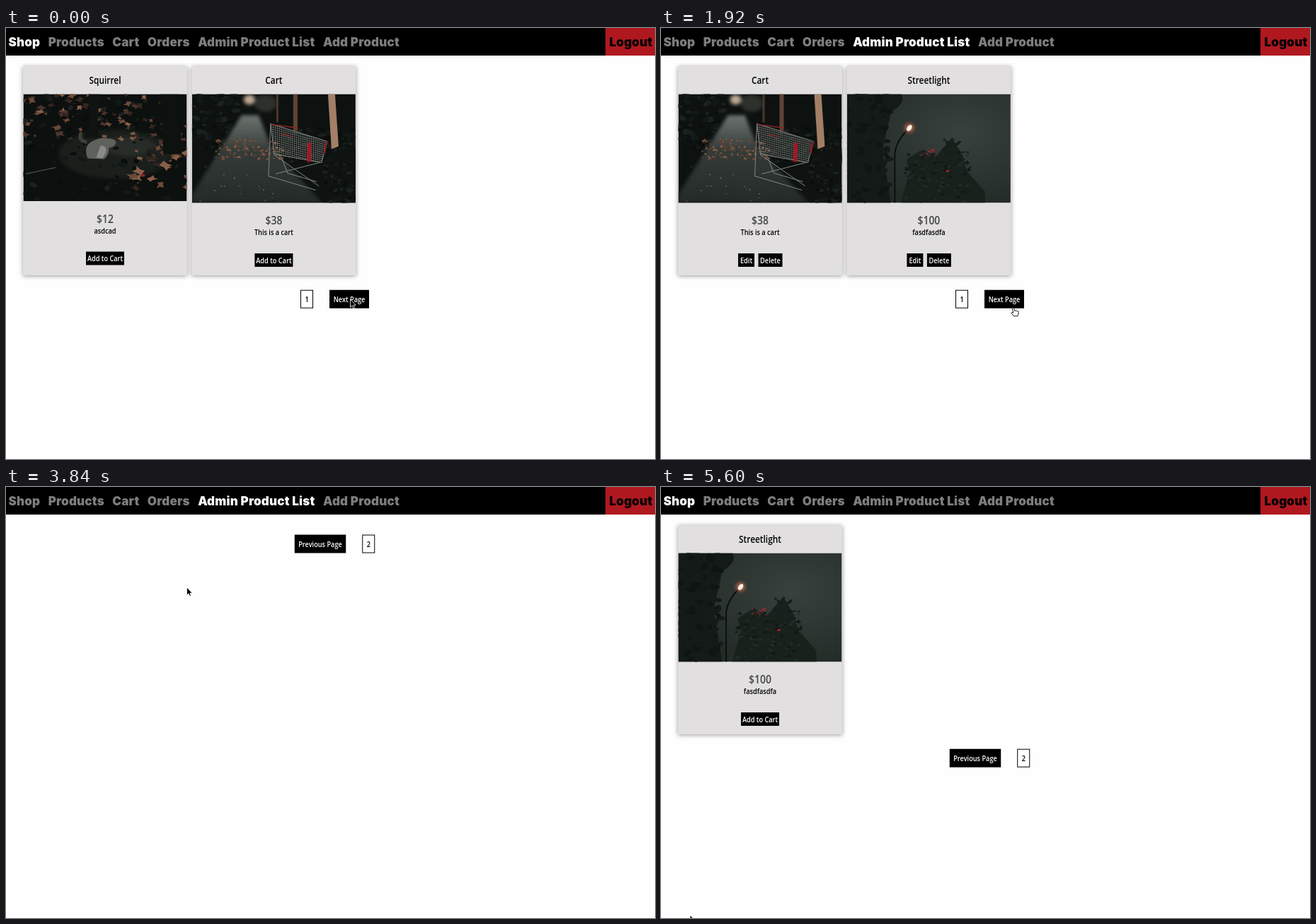
These frames come from a looping animation (917x610 px, 5760 ms). An HTML page:

```html
<!DOCTYPE html>
<html lang="en">
<head>
<meta charset="utf-8">
<title>Shop</title>
<style>
  html, body { margin: 0; width: 100%; height: 100%; overflow: hidden; background: #fefefe; }
  #stage { display: block; width: 917px; height: 610px; }
  .nav { font: 900 17px Inter, sans-serif; letter-spacing: .2px; }
  .label { font-family: "Open Sans", "Noto Sans", sans-serif; font-weight: 600; text-anchor: middle; }
  .card { filter: drop-shadow(0 1.5px 3px #0006); }
  .soft { filter: blur(2.5px); }
</style>
</head>
<body>
<svg id="stage" viewBox="0 0 917 610">
  <defs>
    <radialGradient id="glow">
      <stop stop-color="#ff9a6a"/>
      <stop offset="1" stop-color="#703828" stop-opacity="0"/>
    </radialGradient>
    <radialGradient id="dusk" cx=".7" cy=".35" r=".75">
      <stop stop-color="#39413e"/>
      <stop offset="1" stop-color="#222a26"/>
    </radialGradient>
    <linearGradient id="path" x2="0" y2="1">
      <stop stop-color="#6d7470"/>
      <stop offset=".4" stop-color="#343b38"/>
      <stop offset="1" stop-color="#232a28"/>
    </linearGradient>
    <pattern id="mesh" width="3" height="3" patternUnits="userSpaceOnUse" patternTransform="skewY(14)">
      <path d="M0 .5H3M.5 0V3" stroke="#8e918d" stroke-width=".5"/>
    </pattern>
    <path id="leaf" d="M-6 0L-2-2 1-5 2-1 6 1 1 2-2 5Z"/>
    <ellipse id="blob" rx="5" ry="3.2"/>
    <path id="arrow" d="M0 0V11.2L2.6 8.8 4.2 12.6 6 11.8 4.5 8.2H7.8Z" stroke="#fff" stroke-width=".8"/>
    <path id="hand" d="M-1 1Q0-.9 1.2.8L2.2 4.4Q3.4 3.3 4.2 4.5 5.4 3.6 6.1 4.9 7.6 4.3 7.7 6.2L7.4 9.2 6.4 11.8H1.2L-2.5 7.6Q-2.6 6 -.8 6.6L.2 7.2Z" fill="#fff" stroke="#000" stroke-width=".9"/>
    <g id="photos"></g>
  </defs>
  <g id="page"></g>
  <use id="cursor"/>
</svg>
<script>
const STEP = 160, LOOP = 5760, PAGE_SIZE = 2;
const $ = id => document.getElementById(id);

let seed = 48271;
const random = () => (seed = seed * 16807 % 2147483647) / 2147483647;
const spread = (middle, reach) => middle + (random() * 2 - 1) * reach;

// Strews a small shape around (x, y), lying flat and turned at random.
function scatter(id, count, x, y, reachX, reachY, size, colors) {
  return Array.from({ length: count }, () => {
    const place = `translate(${spread(x, reachX)} ${spread(y, reachY)}) scale(1 .7)`;
    const turn = `rotate(${random() * 360}) scale(${size * (.4 + random())})`;
    return `<use href="#${id}" transform="${place} ${turn}" fill="${colors[Math.floor(random() * colors.length)]}"/>`;
  }).join('');
}

const rect = (x, y, w, h, fill, extra = '') =>
  `<rect x="${x}" y="${y}" width="${w}" height="${h}" fill="${fill}" ${extra}/>`;
const oval = (x, y, rx, ry, fill) => `<ellipse cx="${x}" cy="${y}" rx="${rx}" ry="${ry}" fill="${fill}"/>`;
const shape = (d, fill) => `<path d="${d}" fill="${fill}"/>`;
const line = (d, color, width) => `<path d="${d}" fill="none" stroke="${color}" stroke-width="${width}"/>`;
const soft = content => `<g class="soft">${content}</g>`;
const backdrop = fill => rect(0, 0, 231, 154, fill);

const rust = ['#4b352b', '#6d4938', '#8a5f49', '#33261f'];
const night = ['#090d0c', '#121815', '#1b211d'];
const green = ['#2b4732', '#3b5c42', '#1c3023', '#0f1812'];

const squirrel = () =>
  backdrop('#0c100f') +
  soft(oval(130, 85, 80, 35, '#1a1f1b') + oval(150, 74, 36, 14, '#282c28')) +
  scatter('blob', 90, 115, 75, 115, 75, 1, night) +
  scatter('leaf', 70, 115, 32, 115, 32, 1, rust) +
  scatter('leaf', 40, 190, 100, 45, 45, 1.3, rust) +
  shape('M92 0H108L104 50 110 62H86L95 45Z', '#0f1311') +
  shape('M193 0H220L224 85H198Z', '#0d1110') +
  line('M3 113L46 104', '#5a5d58', 1) +
  line('M90 68Q76 66 82 54', '#3d3e3a', 5) +
  shape('M91 91Q83 72 101 65Q112 60 120 63Q130 62 131 69Q129 75 121 76Q121 87 114 92Z', '#5f615d') +
  shape('M109 73Q118 72 117 82L112 91 103 90Z', '#8b8a84') +
  oval(169, 115, 3, 2, '#8d2422');

const cart = () =>
  backdrop('#0d1210') +
  scatter('blob', 80, 32, 40, 32, 40, 1, night) +
  soft(oval(81, 8, 8, 7, '#bda992') + oval(104, 13, 16, 12, '#2e302b') +
    shape('M70 30H94L112 75 184 154H0V142Z', 'url(#path)')) +
  scatter('leaf', 140, 82, 78, 48, 14, .4, ['#795039', '#8f6044', '#5c4233']) +
  scatter('leaf', 60, 90, 120, 80, 34, .25, rust) +
  scatter('blob', 130, 185, 72, 52, 24, .8, night) +
  shape('M155 91L231 75V154H185Z', '#0e1311') +
  scatter('blob', 60, 210, 122, 24, 32, .8, night) +
  rect(143, 0, 6, 52, '#5f4335') + rect(119, 0, 3, 40, '#4a372c') +
  shape('M192 0H202L207 74 197 78Z', '#a27f66') +
  shape('M111 42L191 67 183 97 116 85Z', 'url(#mesh)') +
  line('M111 42L191 67 183 97 116 85ZL108 116 175 136M116 86L179 130M126 89L135 112 176 124M180 97L118 113', '#858884', 1) +
  line('M111 43L150 48M126 57L141 60', '#842626', 1.5) +
  line('M166 69L165 96', '#a51722', 5.5) + line('M190 67L187 84', '#8d1d24', 2.5);

const streetlight = () =>
  backdrop('url(#dusk)') +
  shape('M0 0H77Q83 14 62 25L50 80 62 154H0Z', '#131a17') +
  scatter('blob', 110, 30, 77, 30, 77, 1.2, ['#0f1512', '#141b18']) +
  shape('M76 154L88 112 84 92 107 78 125 89 148 62 162 84 170 110 195 138V154Z', '#19211d') +
  scatter('leaf', 150, 128, 118, 46, 36, .6, ['#171f1b', '#111814', '#222b26']) +
  scatter('leaf', 30, 150, 82, 14, 18, .6, ['#161e1a']) +
  scatter('leaf', 18, 114, 84, 10, 6, .3, ['#a92b2b', '#7e2424']) +
  oval(142, 109, 2.5, 1.5, '#a52424') +
  line('M67.5 154V84Q69 67 85 51', '#080c0a', 1.8) +
  oval(88, 48, 11, 11, 'url(#glow)') +
  `<g transform="rotate(35 88 48)">${oval(88, 48, 3, 5, '#fff0e5')}</g>`;

const rose = () =>
  backdrop('#18211b') +
  soft(oval(120, 25, 38, 22, '#4c564f') + oval(150, 38, 28, 18, '#414c44') +
    scatter('blob', 110, 150, 80, 95, 38, 2.2, green) +
    scatter('blob', 40, 25, 55, 45, 50, 2, ['#141c17', '#1f2b23']) +
    scatter('blob', 50, 150, 135, 80, 22, 2.2, ['#0d1510', '#18271d']) +
    oval(21, 36, 8, 8, '#633a2c') + oval(17, 8, 5, 8, '#4a3228') + oval(87, 75, 5, 5, '#8a4b38') +
    oval(218, 105, 5, 4, '#8a2329')) +
  line('M112 78Q106 108 82 154M25 154L42 120', '#22382a', 1.2) +
  scatter('blob', 14, 55, 140, 40, 16, 1.8, ['#34583d', '#456d4e']) +
  scatter('blob', 7, 108, 72, 14, 12, 1.4, ['#2f5038']) +
  shape('M102 50Q108 42 119 44Q131 42 136 54Q142 61 135 70Q125 82 112 78Q99 73 102 62Z', '#650f17') +
  shape('M103 55Q115 61 116 77Q104 77 102 65ZM120 46Q133 46 133 57L121 64 112 54Z', '#861922') +
  line('M109 52Q119 46 128 54Q127 66 116 62Q115 53 123 55M137 60Q130 72 117 74', '#35090e', 1.5) +
  line('M131 60Q137 61 136 67', '#b14347', 1);

const products = {
  Squirrel: { photo: squirrel, height: 151.5, price: '$12', note: 'asdcad' },
  Cart: { photo: cart, height: 154, price: '$38', note: 'This is a cart', mine: true },
  Streetlight: { photo: streetlight, height: 154, price: '$100', note: 'fasdfasdfa', mine: true },
  Rose: { photo: rose, height: 154, price: '$100', note: 'fasdkfasdkjfs', mine: true }
};
$('photos').innerHTML = Object.entries(products).map(([name, p]) =>
  `<symbol id="${name}" viewBox="0 0 231 ${p.height}">${p.photo()}</symbol>`).join('');

// Condensed lettering, centred on x.
const label = (text, x, y, size = 11.2, fill = '#000') =>
  `<text class="label" transform="translate(${x} ${y}) scale(.82 1)" font-size="${size}" fill="${fill}">${text}</text>`;
const button = (text, x, y, w, h) => rect(x, y, w, h, '#000') + label(text, x + w / 2, y + h / 2 + 4, 11.2, '#fff');

function card(name, index, admin) {
  const p = products[name], x = 24 + index * 238.4, mid = x + 116, bottom = 94 + p.height;
  const actions = admin
    ? button('Edit', mid - 31, bottom + 71, 23, 19) + button('Delete', mid - 2.5, bottom + 71, 34, 19)
    : button('Add to Cart', mid - 27, bottom + 71, 54, 19);
  return rect(x, 54, 232, 296, '#e1dfdf', 'class="card"') +
    label(name, mid, 79, 14.5) +
    `<use href="#${name}" x="${x + .5}" y="93.5" width="231" height="${p.height}"/>` +
    label(p.price, mid, bottom + 30, 17, '#444') + label(p.note, mid, bottom + 45) + actions;
}

// A centred row: previous button, page number, next button.
function pager(page, hasNext, y) {
  const parts = [[String(page + 1), 18]];
  if (page) parts.unshift(['Previous Page', 72.5]);
  if (hasNext) parts.push(['Next Page', 56]);
  const gap = 23;
  let x = 464.5 - (parts.reduce((sum, [, w]) => sum + w + gap, -gap)) / 2;
  return parts.map(([text, w]) => {
    const left = x;
    x += w + gap;
    return w > 18 ? button(text, left, y, w, 26)
      : rect(left + .5, y + .5, 17, 25, '#fff', 'stroke="#000"') + label(text, left + 9, y + 17);
  }).join('');
}

const ADMIN = 'Admin Product List';
const links = ['Shop', 'Products', 'Cart', 'Orders', ADMIN, 'Add Product'];

// Where the pointer rests, in steps, and what it clicks on leaving.
const visits = [
  { from: 0, to: 2, x: 486.5, y: 384, click: 'next' },
  { from: 7, to: 9, x: 372.5, y: 17, click: ADMIN },
  { from: 12, to: 14, x: 497.5, y: 396, click: 'next' },
  { from: 16, to: 16, x: 499.5, y: 386 },
  { from: 18, to: 19, x: 154, y: 327, click: 'delete' },
  { from: 22, to: 23, x: 450, y: 78 },
  { from: 24, to: 24, x: 255.5, y: 142 },
  { from: 25, to: 25, x: 300, y: 18, click: ADMIN },
  { from: 26, to: 28, x: 33.5, y: 24, click: 'Shop' },
  { from: 32, to: 33, x: 484, y: 382, click: 'next' },
  { from: 34, to: 34, x: 479, y: 373 },
  { from: 35, to: 36, x: 41, y: 606 }
];

function shopAt(step) {
  let view = 'Shop', page = 0, stock = Object.keys(products);
  for (const { to, click } of visits) {
    if (to > step) break;
    if (click === 'next') page++;
    else if (click === 'delete') stock = stock.filter(name => name !== 'Rose');
    else if (click) [view, page] = [click, 0];
  }
  const listed = stock.filter(name => view === 'Shop' || products[name].mine);
  const start = page * PAGE_SIZE, end = start + PAGE_SIZE;
  return { view, page, names: listed.slice(start, end), hasNext: listed.length > end };
}

function pointerAt(step) {
  const i = visits.findLastIndex(visit => visit.from <= step), here = visits[i];
  if (step < here.to || here.from === here.to && step === here.to) {
    return { ...here, kind: here.click && i > 0 ? 'hand' : 'arrow' };
  }
  const next = visits[i + 1], k = (step - here.to) / (next.from - here.to);
  return { x: here.x + (next.x - here.x) * k, y: here.y + (next.y - here.y) * k, kind: 'arrow' };
}

function draw(step) {
  const { view, page, names, hasNext } = shopAt(step);
  const pointer = pointerAt(step);
  const nav = links.map((text, i) =>
    `<tspan dx="${i && 11.4}" fill="${text === view || text === pointer.click ? '#fff' : '#7d7d7d'}">${text}</tspan>`).join('');
  $('page').innerHTML = rect(0, 0, 917, 39, '#000') + `<text class="nav" x="3.5" y="26">${nav}</text>` +
    rect(847, 0, 70, 39, '#b01820') + '<text class="nav" x="852.5" y="26">Logout</text>' +
    names.map((name, i) => card(name, i, view === ADMIN)).join('') +
    pager(page, hasNext, names.length ? 370.7 : 67.5);
  $('cursor').setAttribute('href', '#' + pointer.kind);
  $('cursor').setAttribute('transform', `translate(${pointer.x} ${pointer.y})`);
}

let shown = -1;
function tick() {
  const step = Math.floor(performance.now() % LOOP / STEP);
  if (step !== shown) draw(shown = step);
  requestAnimationFrame(tick);
}
tick();
</script>
</body>
</html>
```
